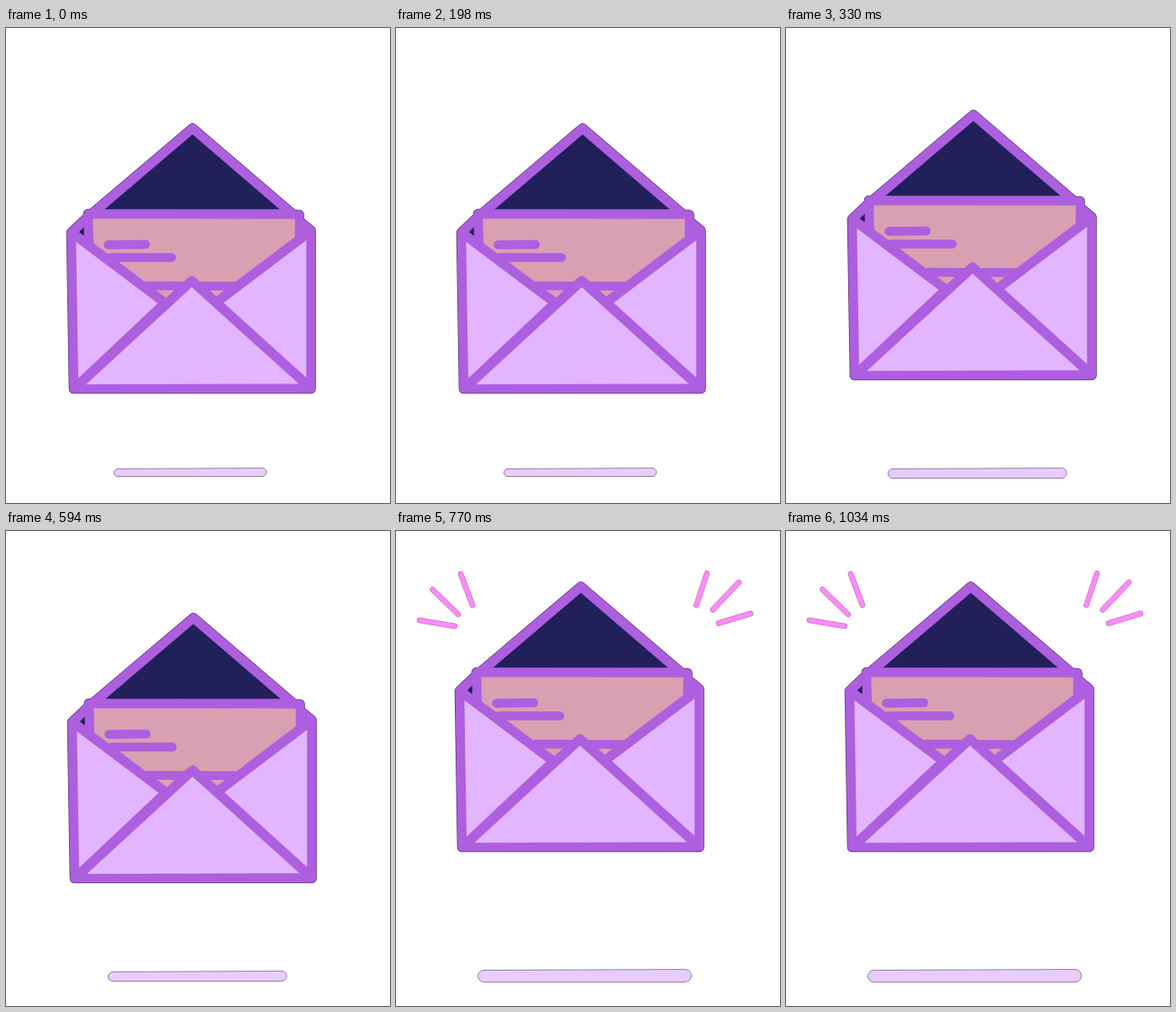
Recreate the animation shown at these times as an HTML page. Size 457 px wide and 564 px high, loop 1.21 s.

```html
<!DOCTYPE html>
<html lang="en">
<head>
<meta charset="utf-8">
<title>Open envelope</title>
<style>
  html, body { margin: 0; width: 100%; height: 100%; overflow: hidden; background: #fff; }
  svg { display: block; width: 100vw; height: 100vh; }
  path { stroke-linecap: round; stroke-linejoin: round; }
  .ink { fill: none; stroke: #ad5fdf; stroke-width: 10.4; }
  .edge { fill: none; stroke: #4f3565; stroke-width: 11.6; }
  .body { fill: #ad5fdf; stroke: #ad5fdf; stroke-width: 10.2; }
  .panel { fill: #e2b5fe; stroke: #ad5fdf; stroke-width: 11.4; }
  .inside { fill: #21205b; stroke: #ad5fdf; stroke-width: 11.4; }
  .paper { fill: #d9a0b1; }
  .soft { filter: blur(.7px); }
  .shadow { fill: #e8cdfc; stroke: #75647f; stroke-width: .8; }
  .ray-edge { fill: none; stroke: #a865a8; stroke-width: 6.6; }
  .ray { fill: none; stroke: #fa8cf6; stroke-width: 5.6; }
</style>
</head>
<body>
<svg viewBox="0 0 457 564">
  <defs>
    <path id="outline" d="M222 119 L102 220.5 H97.5 V224 L77.5 243 L80.5 428.5 H363 V240.5 L349 229 V221.5 H342Z"/>
    <clipPath id="within"><use href="#outline"/></clipPath>
  </defs>

  <g id="shadows"></g>

  <g id="envelope">
    <use class="edge" href="#outline"/>
    <use class="body" href="#outline"/>
    <g clip-path="url(#within)">
      <g class="soft">
        <path class="inside" d="M78 243 L98.5 223 V258Z"/>
        <path class="inside" d="M222 119 L102 221 H341Z"/>
        <path class="paper" d="M98 221 H349 V248 L250 328 H189 L99 260Z"/>
        <path class="ink" d="M99 258 L98 221 L349 221.5 V247 M121.5 257.5 L166 257 M124 272.5 H197 M168 306 L272 306.5"/>
        <path class="panel" d="M77.5 242.5 L189.5 326.5 L80.5 429Z"/>
        <path class="panel" d="M363 240.5 L250 326 L363 428Z"/>
        <path class="panel" d="M80.5 429 L221 300 L363 428Z"/>
      </g>
    </g>
  </g>

  <g id="rays">
    <path class="ray-edge"/>
    <path class="ray"/>
  </g>
</svg>
<script>
  // Each pose: start time, envelope offset, shadow box [left, right, top, bottom], rays shown
  const LOOP = 1210;
  const poses = [
    { at: 0,   move: [0, 0],    shadow: [128.5, 310, 522.5, 532.5] },
    { at: 330, move: [1, -16],  shadow: [121.5, 334, 522.5, 534.5] },
    { at: 770, move: [-2, -53], shadow: [97.5, 351.5, 520.5, 535.5], rays: true }
  ];
  const rayLines = 'M77 51 L91 88 M43.5 69.5 L74 99 M28 106 L70 113 ' +
                   'M370 50.5 L357.5 88 M408 61 L377 93.5 M422 98 L384 109.5';

  const byId = id => document.getElementById(id);

  function playSteps(element, frameFor) {
    const frames = poses.map((pose, i) => ({
      ...frameFor(pose, i), offset: pose.at / LOOP, easing: 'step-end'
    }));
    frames.push({ ...frames[frames.length - 1], offset: 1 });
    return element.animate(frames, { duration: LOOP, iterations: Infinity });
  }

  // A rounded bar whose left end is slightly slimmer than its right end
  function barPath([left, right, top, bottom]) {
    const r = (bottom - top) / 2;
    const s = r - .5;
    return `M${left + s} ${top + 1} L${right - r} ${top} ` +
           `A${r} ${r} 0 0 1 ${right - r} ${bottom} ` +
           `H${left + s} A${s} ${s} 0 0 1 ${left + s} ${top + 1}Z`;
  }

  const show = on => ({ opacity: on ? 1 : 0 });

  const players = [
    playSteps(byId('envelope'), ({ move: [x, y] }) => ({ transform: `translate(${x}px, ${y}px)` })),
    playSteps(byId('rays'), pose => show(pose.rays))
  ];

  poses.forEach((pose, i) => {
    const bar = document.createElementNS('http://www.w3.org/2000/svg', 'path');
    bar.setAttribute('class', 'shadow');
    bar.setAttribute('d', barPath(pose.shadow));
    byId('shadows').append(bar);
    players.push(playSteps(bar, (_, k) => show(k === i)));
  });

  for (const path of byId('rays').children) path.setAttribute('d', rayLines);

  const start = document.timeline.currentTime ?? 0;
  for (const player of players) player.startTime = start;
</script>
</body>
</html>
```
